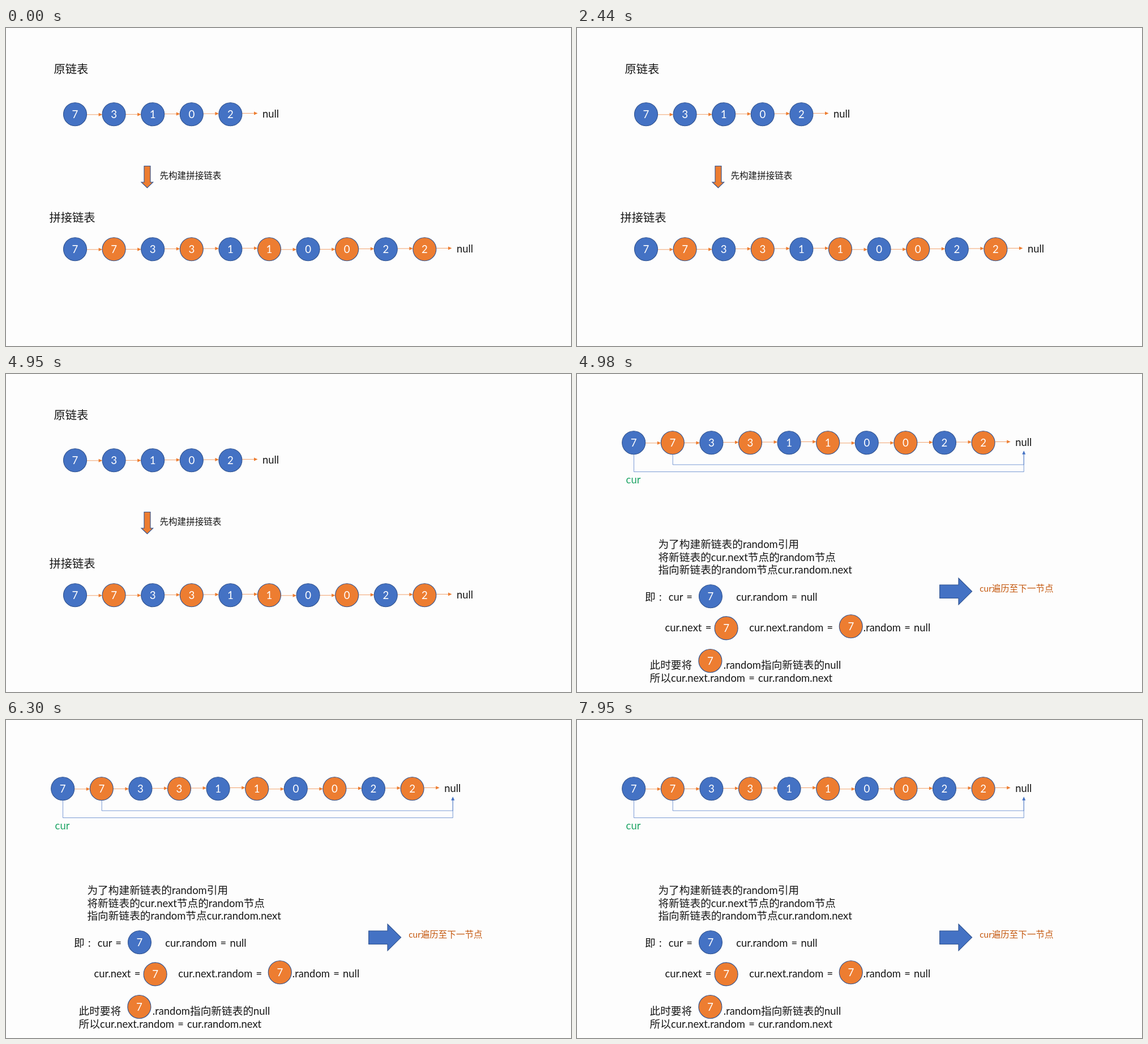
An HTML page for the animation above (7990 ms loop, 998 px wide and 561 px high).

```html
<!DOCTYPE html>
<html lang="zh-CN">
<head>
<meta charset="utf-8">
<title>链表复制</title>
<style>
  html, body { margin: 0; width: 100%; height: 100%; overflow: hidden; background: #fdfdfd; }
  svg { display: block; width: 998px; height: 561px; }
  text { font-family: Lato, "Noto Sans CJK SC", "Noto Sans CJK", sans-serif; }
  .han { font-family: "Noto Sans CJK SC", "Noto Sans CJK", sans-serif; font-weight: 350; }
  .latin { word-spacing: 1.5px; }
  .digit { font-size: 18.7px; fill: #fff; text-anchor: middle; }
  .title .han { font-weight: 300; }
</style>
</head>
<body>
<svg id="stage" viewBox="0 0 998 561" xmlns="http://www.w3.org/2000/svg">
  <g id="build"></g>
  <g id="random"></g>
</svg>
<script>
const BLUE = '#4472c4', ORANGE = '#ed7d31', EDGE = '#2f528f', INK = '#161616';
const LOOP = 7990, CUT = 4975;
const STEP = 68.6, R = 20.5;
// vertical drift of the connectors, repeating every five nodes
const DRIFT = [0.6, 0.2, -0.6, -1.1, -1.7];

const build = document.getElementById('build');
const random = document.getElementById('random');

function add(parent, name, attrs, content) {
  const el = document.createElementNS('http://www.w3.org/2000/svg', name);
  for (const key in attrs) el.setAttribute(key, attrs[key]);
  if (content) el.textContent = content;
  parent.appendChild(el);
  return el;
}

// Latin runs are set a little smaller than the Chinese ones
function label(parent, x, y, str, size = 18.7, fill = INK, cls = '') {
  const el = add(parent, 'text', { x, y, fill, class: cls });
  for (const run of str.match(/[\x00-\x7f]+|[^\x00-\x7f]+/g)) {
    const latin = run.charCodeAt(0) < 128;
    add(el, 'tspan', {
      class: latin ? 'latin' : 'han',
      'font-size': latin ? size * 0.984 : size
    }, run);
  }
}

function node(parent, x, y, digit, fill) {
  add(parent, 'circle', { cx: x, cy: y, r: R, fill, stroke: EDGE, 'stroke-width': 1.1 });
  add(parent, 'text', { x, y: y + 7, class: 'digit' }, digit);
}

function link(parent, x1, x2, y) {
  add(parent, 'path', { d: `M${x1} ${y}H${x2 - 5}`, stroke: ORANGE, 'stroke-width': 0.7 });
  add(parent, 'path', { d: `M${x2} ${y}l-6.5 -3v6z`, fill: ORANGE });
}

function list(parent, x, y, digits, doubled) {
  [...digits].forEach((digit, i) => {
    const cx = x + i * STEP;
    link(parent, cx + R, cx + STEP - R, y + DRIFT[i % DRIFT.length]);
    node(parent, cx, y, digit, doubled && i % 2 ? ORANGE : BLUE);
  });
  label(parent, x + digits.length * STEP - 12, y + 6, 'null');
}

function elbow(parent, x, depth) {
  add(parent, 'path', {
    d: `M${x} 141.5V${depth}H789.3V141`, fill: 'none', stroke: BLUE, 'stroke-width': 0.7
  });
}

function block(parent, d, fill) {
  add(parent, 'path', { d, fill, stroke: EDGE, 'stroke-width': 1.1 });
}

// building the interleaved list
label(build, 84.5, 80, '原链表', 20.3, INK, 'title');
list(build, 122, 152.2, '73102', false);
block(build, 'M244 243.5H255V272H259.7L249.4 282L239 272H244Z', ORANGE);
label(build, 271.5, 265.5, '先构建拼接链表', 15.55);
label(build, 76.5, 342, '拼接链表', 20.3, INK, 'title');
list(build, 122, 390.2, '7733110022', true);

// wiring the random references
list(random, 100.2, 121.2, '7733110022', true);
elbow(random, 100.5, 172.5);
elbow(random, 169.2, 160);
add(random, 'path', { d: 'M789.3 135.3l-3 6.5h6z', fill: BLUE });
label(random, 86.6, 192.5, 'cur', 18.7, '#1fa566');

label(random, 143.4, 307, '为了构建新链表的random引用');
label(random, 143.4, 329.5, '将新链表的cur.next节点的random节点');
label(random, 143.4, 352, '指向新链表的random节点cur.random.next');

label(random, 120, 400, '即');
label(random, 145, 399.5, ':');
label(random, 161.8, 399.5, 'cur =');
node(random, 236, 392.2, '7', BLUE);
label(random, 281.2, 400.3, 'cur.random = null');

label(random, 155.5, 453.6, 'cur.next =');
node(random, 263.6, 448.4, '7', ORANGE);
label(random, 304.3, 453.8, 'cur.next.random =');
node(random, 483.8, 445.2, '7', ORANGE);
label(random, 505.8, 453.6, '.random = null');

label(random, 128.5, 520.4, '此时要将');
node(random, 235.4, 506, '7', ORANGE);
label(random, 258.8, 520.4, '.random指向新链表的null');
label(random, 128.5, 542.5, '所以cur.next.random = cur.random.next');

block(random, 'M640.7 372H674V360L697.7 383.6L674 407V395.5H640.7Z', BLUE);
label(random, 711.3, 383.5, 'cur遍历至下一节点', 15.55, '#c55a11');

function draw(time) {
  const second = time % LOOP >= CUT;
  build.style.display = second ? 'none' : '';
  random.style.display = second ? '' : 'none';
}

const start = performance.now();
function tick() {
  draw(performance.now() - start);
  requestAnimationFrame(tick);
}
tick();
</script>
</body>
</html>
```
